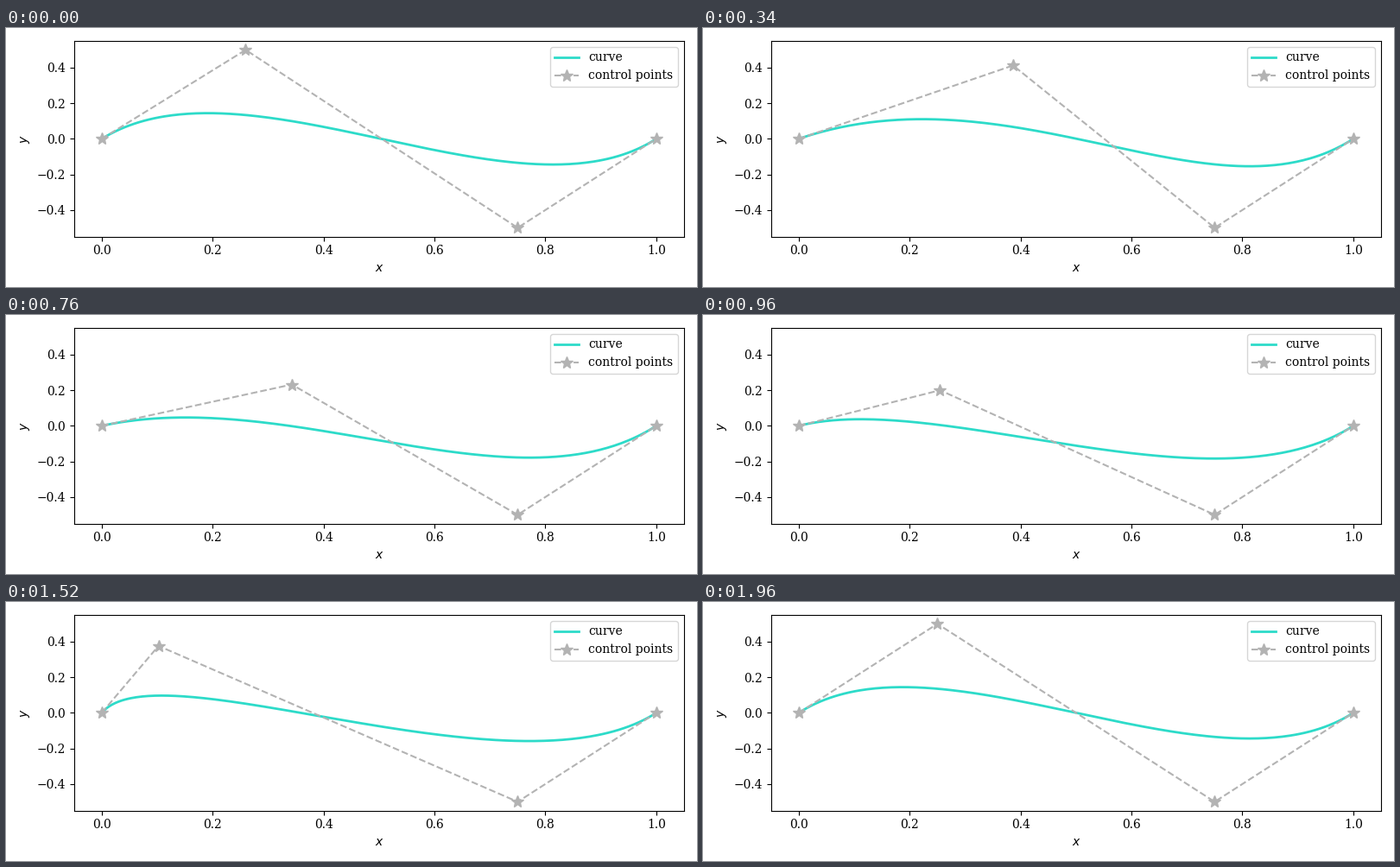
A matplotlib script that plays this animation: 800 by 300 pixels, repeating every 1980 ms.

```python
import numpy as np
import matplotlib.pyplot as plt
from matplotlib.animation import FuncAnimation

FRAMES = 99
CENTER = np.array([0.25, 0.35])
RADIUS = 0.15

plt.rcParams.update({"font.family": "DejaVu Serif", "font.size": 10})

t = np.linspace(0, 1, 200)[:, None]


def control_points(i):
    """Second control point runs clockwise round a circle."""
    a = 2 * np.pi * (i + 1) / FRAMES
    moving = CENTER + RADIUS * np.array([np.sin(a), np.cos(a)])
    return np.array([[0, 0], moving, [0.75, -0.5], [1, 0]])


def bezier(p):
    s = 1 - t
    return s**3 * p[0] + 3 * s**2 * t * p[1] + 3 * s * t**2 * p[2] + t**3 * p[3]


fig, ax = plt.subplots(figsize=(8, 3), dpi=100)
curve, = ax.plot([], [], color="#2ddbc9", lw=2, label="curve")
polygon, = ax.plot([], [], "--*", color="#b3b3b3", lw=1.5, ms=10,
                   label="control points")
ax.set(xlim=(-0.05, 1.05), ylim=(-0.55, 0.55), xlabel="$x$", ylabel="$y$")
ax.legend(loc="upper right")
fig.tight_layout()


def update(i):
    p = control_points(i)
    curve.set_data(*bezier(p).T)
    polygon.set_data(*p.T)
    return curve, polygon


anim = FuncAnimation(fig, update, frames=FRAMES, interval=20, repeat=True,
                     repeat_delay=0)
plt.show()
```
